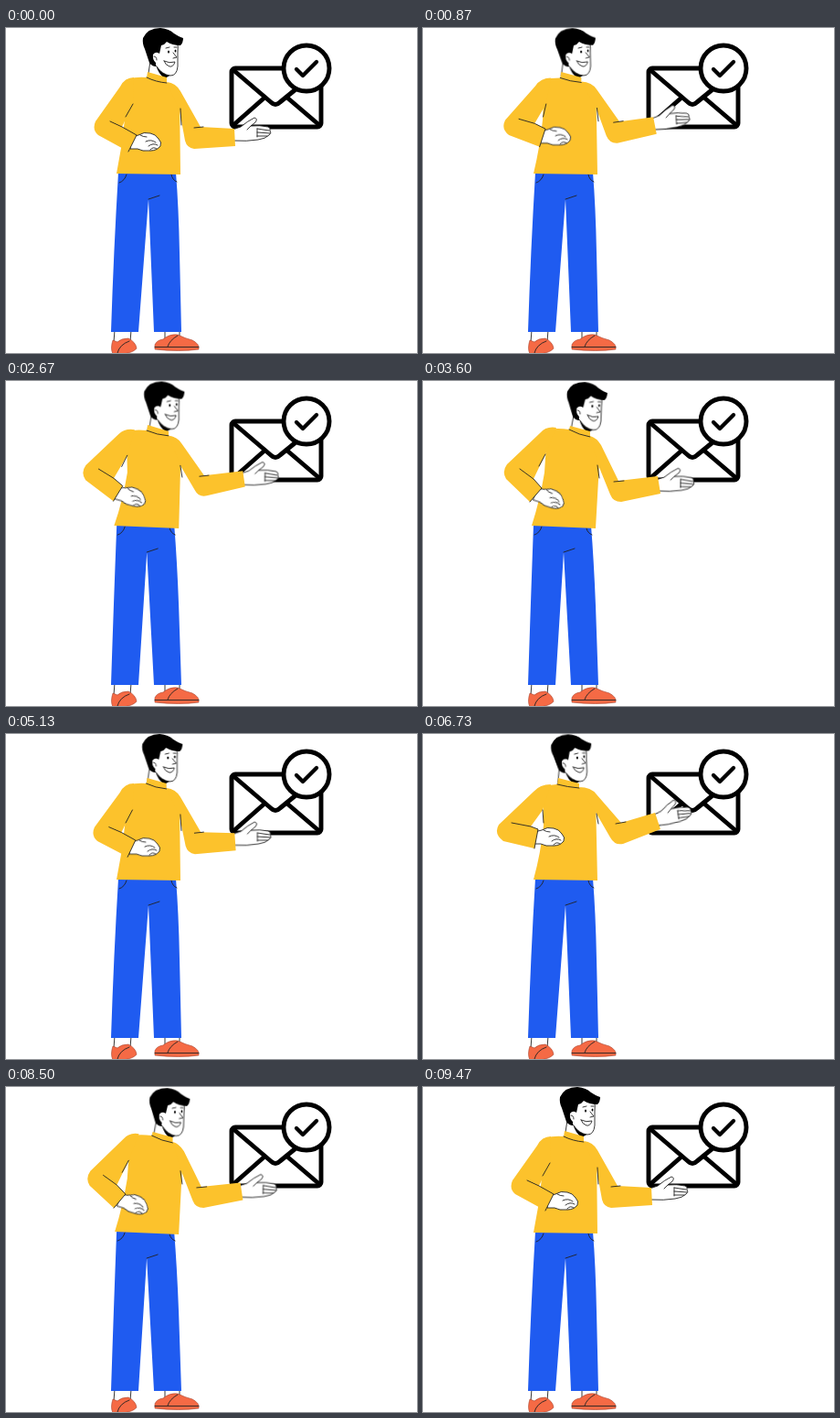
Recreate the animation shown at these times as an HTML page. Size 450 px wide and 355 px high, loop 9.51 s.

```html
<!DOCTYPE html>
<html lang="en">
<head>
<meta charset="utf-8">
<title>Message delivered</title>
<style>
html, body { margin: 0; width: 100%; height: 100%; overflow: hidden; background: #fff; }
svg { display: block; width: 100vw; height: 100vh; }

.ink { fill: none; stroke: #222; stroke-width: .9; stroke-linecap: round; stroke-linejoin: round; }
.skin { fill: #fff; stroke: #222; stroke-width: .9; stroke-linejoin: round; }
.shirt { fill: #fcc22c; }
.jeans { fill: #1f5bf0; }
.shoe { fill: #f56a45; stroke: #a8402a; stroke-width: .6; }
.icon { fill: none; stroke: #000; stroke-width: 4.9; stroke-linecap: round; stroke-linejoin: round; }

/* Each part holds four poses: a rest, b raised, c passing, d leaning */
.morph { animation: morph 4755ms infinite; }
.move { animation: move 4755ms infinite; }
.morph, .move { animation-timing-function: ease-in-out; }
@keyframes morph {
  0%, 2%, 93%, 100% { d: var(--a); }
  33.6% { d: var(--b); }
  41% { d: var(--b); animation-timing-function: cubic-bezier(.4, 0, .7, .8); }
  58.4% { d: var(--c); animation-timing-function: cubic-bezier(.25, .4, .6, 1); }
  75.7% { d: var(--d); }
}
@keyframes move {
  0%, 2%, 93%, 100% { transform: var(--a); }
  33.6% { transform: var(--b); }
  41% { transform: var(--b); animation-timing-function: cubic-bezier(.4, 0, .7, .8); }
  58.4% { transform: var(--c); animation-timing-function: cubic-bezier(.25, .4, .6, 1); }
  75.7% { transform: var(--d); }
}

#legs {
  --a: path("M123 158 L186 158 Q189 195 190 245 L192 332 L162 332 L156 187 L145 332 L115 332 Q118 240 123 158Z");
  --b: var(--a);
  --c: path("M121 157 L184 158 Q187 195 189 245 L192 332 L162 332 L154 187 L145 332 L115 332 Q118 240 121 157Z");
  --d: var(--c);
}
#seams {
  --a: path("M124 169 Q130 167 132 160 M181 160 Q182 166 187 168 M156 187 L168 183");
  --b: var(--a);
  --c: path("M122 168 Q128 166 130 159 M179 161 Q180 166 185 168 M154 187 L166 183");
  --d: var(--c);
}
#torso {
  --a: path("M155 48 L176 54 L176 60 Q187 61 190 72 L191 160 L121 159 Q127 130 130 100 L135 56 Q142 53 154 54Z");
  --b: path("M148 48 L171 54 L171 59 Q185 59 189 69 L191 160 L121 159 Q129 130 132 100 L131 57 Q137 56 147 55Z");
  --c: path("M156 48 L179 55 L179 60 Q189 61 192 72 L189 161 L118 158 Q128 130 133 100 L132 55 Q143 52 155 54Z");
  --d: path("M161 49 L183 55 L183 61 Q191 62 194 73 L189 161 L119 158 Q128 130 133 100 L136 53 Q148 51 160 53Z");
}
#collar {
  --a: path("M154 54 Q164 59 176 60");
  --b: path("M147 55 Q158 58 171 59");
  --c: path("M155 54 Q166 59 179 60");
  --d: path("M160 53 Q171 59 183 61");
}
#armL {
  --a: path("M140 54 Q130 54 125 64 L98 102 Q94 111 101 117 L134 135 L143 117 L127 108 L139 83Z");
  --b: path("M140 55 Q128 55 121 63 L83 99 Q77 109 88 117 L122 125 L126 104 L118 101 L131 83Z");
  --c: path("M141 53 Q131 51 124 57 L88 91 Q82 99 87 107 L117 132 L128 116 L118 107 L133 81Z");
  --d: path("M146 51 Q135 49 128 57 L92 91 Q86 99 91 107 L117 132 L130 117 L121 107 L134 80Z");
}
#foldL {
  --a: path("M139 83 L131 97 M114 102 L127 108 L143 117 L134 135");
  --b: path("M131 83 L132 97 M97 97 L118 101 L126 104 L122 125");
  --c: path("M133 81 L126 93 M102 96 L118 107 L128 116 L117 132");
  --d: path("M134 80 L127 93 M106 96 L121 107 L130 117 L117 132");
}
#armR {
  --a: path("M176 59 Q186 60 191 69 L213 108 L250 110 L251 129 L206 132 Q198 131 196 123 L190 90Z");
  --b: path("M171 58 Q184 58 190 66 L217 97 L254 86 L260 104 L219 120 Q210 122 205 113 L190 87Z");
  --c: path("M179 60 Q188 61 193 69 L217 104 L260 100 L262 117 L220 126 Q211 128 207 120 L191 93Z");
  --d: path("M183 60 Q190 62 195 70 L214 109 L257 104 L260 123 L217 132 Q208 132 205 124 L192 92Z");
}
#foldR {
  --a: path("M191 88 L192 106 M206 109 L216 108");
  --b: path("M190 87 L192 98 M211 98 L222 96");
  --c: path("M191 93 L193 106 M212 105 L222 104");
  --d: path("M191 92 L193 106 M209 110 L220 109");
}
#head {
  transform-origin: 165px 52px;
  --a: translate(0, 0) rotate(0deg);
  --b: translate(-8px, .5px) rotate(-2.5deg);
  --c: translate(2.5px, .5px) rotate(.5deg);
  --d: translate(6.5px, 1px) rotate(2deg);
}
#handL {
  --a: translate(139px, 126px) rotate(0deg);
  --b: translate(124px, 114px) rotate(0deg);
  --c: translate(123px, 125px) rotate(18deg);
  --d: translate(125px, 125px) rotate(18deg);
}
#handR {
  --a: translate(251px, 117px) rotate(0deg);
  --b: translate(256px, 94px) rotate(-8deg);
  --c: translate(260px, 109px) rotate(2deg);
  --d: translate(258px, 114px) rotate(1deg);
}
</style>
</head>
<body>
<svg viewBox="0 0 450 355" preserveAspectRatio="none">
  <g class="icon">
    <rect x="247" y="44" width="98" height="64" rx="4"/>
    <path d="M249 46 L290 81 Q295 86 300 81 L343 46 M249 106 L282 77 M343 106 L309 77"/>
    <circle cx="329" cy="44" r="25" fill="#fff"/>
    <path d="M318 45 L325 52 L340 37" stroke-width="4.3"/>
  </g>

  <g>
    <path class="ink" d="M119 330 L118 343 M137 330 L136 343 M174 330 L174 340 M190 330 L190 337"/>
    <path class="shoe" d="M117 341 Q114 350 117 356 L127 356 Q139 355 143 350 Q142 343 134 339 Q126 339 122 343Z"/>
    <path class="shoe" d="M163 351 L163 346 Q165 341 172 340 Q179 334 188 335 Q196 339 204 341 Q212 345 211 351 Q190 354 163 351Z"/>
    <path class="ink" d="M122 355 Q124 346 135 342 M177 348 Q179 341 188 336 M163 348.5 L211 348.5"/>
  </g>
  <path id="legs" class="jeans morph"/>
  <path id="seams" class="ink morph"/>

  <g id="head" class="move">
    <path class="skin" d="M158 36 L155 56 L175 60 L174 46Z"/>
    <path d="M164 40 Q169 50 181 51 L174 55 Q167 51 164 40Z"/>
    <path class="skin" d="M160 16 L187 13 Q189 20 188 27 L188 42 Q187 52 180 52 Q171 51 165 42 Q159 38 160 30Z"/>
    <path d="M150 11 Q155 0 169 0 Q179 1 184 6 Q190 10 194 11 Q194 16 191 19 Q182 19 176 15 Q174 18 170 19 L168 28 Q164 25 161 29 Q160 34 164 38 L164 42 Q160 42 157 38 L152 23 Q149 17 150 11Z"/>
    <path class="ink" d="M183 27 L187 32 L183 33 M173 36 Q179 39 185 37 Q183 43 179 42 Q175 41 173 36 M175 22 L179 21 M184 21 L187 21 M162 31 Q165 31 165 35"/>
    <ellipse cx="178" cy="26" rx="1" ry="1.6"/>
    <ellipse cx="185.5" cy="25" rx=".9" ry="1.5"/>
  </g>

  <path id="torso" class="shirt morph"/>
  <path id="collar" class="ink morph"/>

  <g id="handL" class="move">
    <path class="skin" d="M-2 -7 L6 -9 Q12 -13 19 -11 Q25 -10 28 -5 Q32 -1 30 3 Q26 8 19 8 Q10 9 5 6 L-3 6Z"/>
    <path class="ink" d="M14 -2 Q20 -5 25 -1 M17 3 Q22 -1 27 2 M19 7 Q22 3 26 6 M8 -9 Q11 -7 15 -7"/>
  </g>
  <path id="armL" class="shirt morph"/>
  <path id="foldL" class="ink morph"/>

  <g id="handR" class="move">
    <path class="skin" d="M-3 -6 L6 -9 Q13 -15 21 -19 Q25 -18 22 -14 L17 -10 Q27 -11 36 -9 Q39 -8 38 -5 Q40 -2 37 0 Q33 4 25 5 Q13 7 -2 6Z"/>
    <path class="ink" d="M17 -10 L13 -6 M24 -7 L37 -5 M24 -3 L38 -2 M24 1 L35 1 M24 -7 L24 2"/>
  </g>
  <path id="armR" class="shirt morph"/>
  <path id="foldR" class="ink morph"/>
</svg>
</body>
</html>
```
